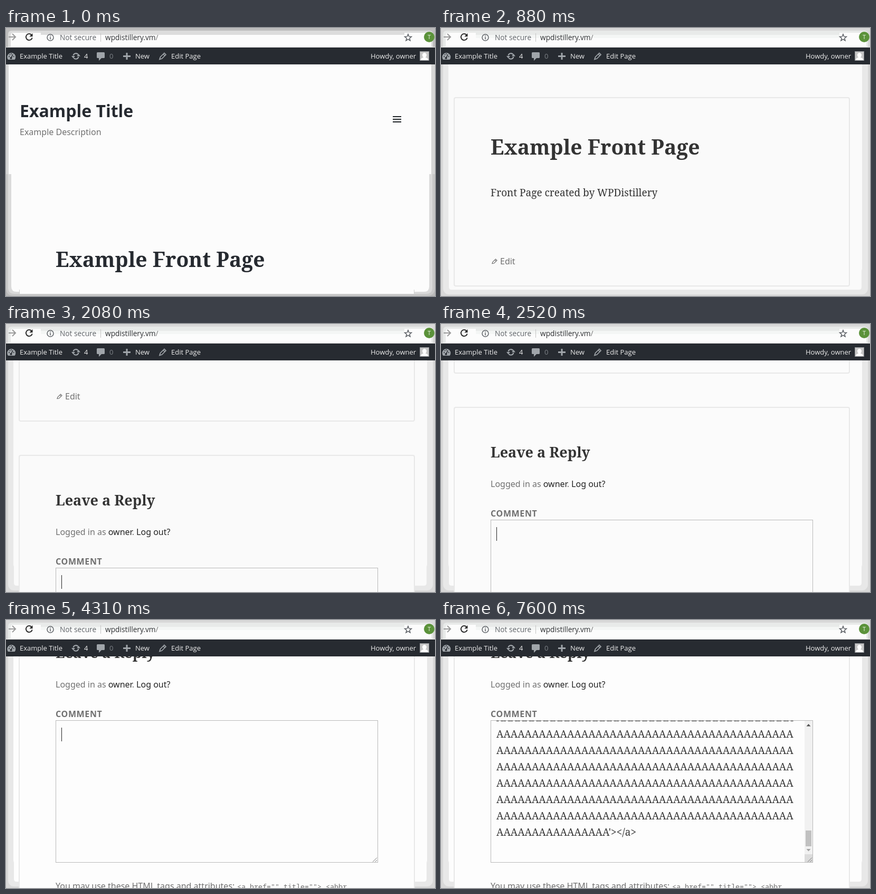
Write an HTML page that moves like this. It is 813 px wide and 508 px high and loops after 8 s.

```html
<!DOCTYPE html>
<html lang="en">
<head>
<meta charset="utf-8">
<title>Comment form</title>
<style>
  html, body { margin: 0; width: 100%; height: 100%; overflow: hidden; background: #d8d8d8; }
  svg { display: block; }
  text { white-space: pre; }
  .ui { font-family: "Open Sans", sans-serif; }
  .sans { font-family: "Noto Sans", sans-serif; font-size: 16px; fill: #707070; }
  .serif { font-family: "Noto Serif", serif; font-size: 19px; fill: #333; }
  .bold { font-weight: 700; }
  .mono { font-family: "Noto Sans Mono", monospace; font-size: 13.33px; }
  .bar { font-size: 13px; fill: #eee; }
  .menu { font-size: 14.7px; fill: #969696; }
  .menu .on { fill: #222; }
</style>
</head>
<body>
<svg width="813" height="508" viewBox="0 0 813 508" xmlns="http://www.w3.org/2000/svg">
  <defs>
    <clipPath id="view"><rect y="69" width="813" height="439"/></clipPath>
    <clipPath id="field"><rect x="95" y="981" width="594" height="268"/></clipPath>
  </defs>

  <g id="edgeA">
    <rect width="813" height="508" fill="#b9b9b9"/>
    <path d="M0 69H813V277H0Z" fill="#d6d6d6"/>
    <path d="M5 69H806V277H5Z" fill="#fcfcfc"/>
    <path d="M0 277H813V492Q813 508 797 508H16Q0 508 0 492Z" fill="#c8c8c8"/>
    <path d="M4 277H808V492Q808 504 796 504H16Q4 504 4 492Z" fill="#dadada"/>
    <path d="M10 277H802V490Q802 500 792 500H774V504H26V500H20Q10 500 10 490Z" fill="#fcfcfc"/>
    <path d="M25.5 496V505M773.5 496V505" stroke="#d0d0d0"/>
  </g>
  <g id="edgeB">
    <rect width="813" height="508" fill="#d8d8d8"/>
    <rect x="4" y="0" width="805" height="505" rx="11" fill="#e8e8e8"/>
    <path id="paper" d="M14 69H798V456L797 460V491Q797 496 792 496H20Q15 496 15 491V460L14 456Z"/>
    <rect id="tail" x="25" y="480" width="749" height="28"/>
  </g>

  <g clip-path="url(#view)">
    <g id="page">
      <g id="cards" fill="none" stroke="#e8e8e8" stroke-width="2">
        <rect x="25" y="345" width="749" height="357" rx="3"/>
        <rect x="25" y="767" width="749" height="700" rx="3"/>
      </g>
      <text class="sans bold" x="26" y="169" style="font-size:32px;fill:#262a30">Example Title</text>
      <text class="sans" x="26" y="203">Example Description</text>
      <path d="M733 168H749M733 173H749M733 178H749" stroke="#22262a" stroke-width="2"/>

      <text id="heading" class="serif bold" x="94" y="453" style="font-size:39px">Example Front Page</text>
      <text class="serif" x="94" y="532">Front Page created by WPDistillery</text>
      <path d="M97 659.500L98 656.500L103.500 651L106 653.500L100.500 659ZM102 652.500L104.500 655" fill="none" stroke="#707070" stroke-width="1.200"/>
      <text class="sans" x="112" y="661">Edit</text>

      <text class="serif bold" x="94" y="862" style="font-size:27px">Leave a Reply</text>
      <text class="sans" x="94" y="918">Logged in as <tspan fill="#222">owner</tspan>. <tspan fill="#222">Log out?</tspan></text>
      <text class="sans bold" x="94" y="974" letter-spacing=".64">COMMENT</text>
      <rect id="box" x="94.500" y="980.500" width="610" height="269" stroke="#b9b9b9"/>
      <g id="pasted">
        <g id="lines" class="serif" clip-path="url(#field)"></g>
        <rect x="689" y="981" width="15" height="253" fill="#f1f1f1"/>
        <rect x="691" y="1189" width="11" height="30" fill="#c1c1c1"/>
        <path d="M692.500 991.500L696.500 987L700.500 991.500Z" fill="#505050"/>
        <path d="M692.500 1224L696.500 1228.500L700.500 1224Z" fill="#a3a3a3"/>
        <rect x="689" y="1234" width="15" height="15" fill="#dcdcdc"/>
      </g>
      <path d="M695 1248.500L703 1240.500M699.500 1248.500L703 1245" stroke="#777"/>
      <rect id="caret" x="105" width="1" height="26" fill="#222"/>
      <text class="sans" x="94" y="1300">You may use these HTML tags and attributes:</text>
      <text class="sans mono" style="font-family:'Noto Sans Mono',monospace;font-size:13.33px" x="438" y="1300">&lt;a href="" title=""&gt; &lt;abbr</text>
    </g>
  </g>

  <g id="menu" class="ui menu">
    <rect x="397.500" y="292" width="281" height="230" rx="10" fill="#e8e8e8"/>
    <rect x="402.500" y="295.500" width="271" height="230" fill="#fdfdfd" stroke="#bdbdbd"/>
    <rect id="hover" x="403" y="410" width="270" height="25" fill="#dfdfdf"/>
    <g id="items"></g>
    <path d="M661 504L666 508.500L661 513Z" fill="#555"/>
  </g>

  <g id="toolbar">
    <rect id="top0" width="813" height="37"/>
    <path id="top1" d="M4 37V12Q4 5 11 5H802Q809 5 809 12V37Z"/>
    <path d="M9 37V14Q9 9 14 9H66V13H755V9H799Q806 9 806 15V37Z" fill="#fcfcfc"/>
    <rect id="sheen" x="66" y="13" width="689" height="6" fill="#f4f6f5"/>
    <path d="M0 36.500H813" stroke="#e2e2e2"/>
    <path d="M5 17H18M12 11L18 17L12 23" fill="none" stroke="#9a9a9a" stroke-width="2"/>
    <path d="M48.300 13A6 6 0 1 0 49.700 18.500" fill="none" stroke="#2b2b2b" stroke-width="2"/>
    <path d="M50.500 10V16.200H44.300Z" fill="#2b2b2b"/>
    <circle cx="84" cy="18" r="6" fill="none" stroke="#5f6368" stroke-width="1.500"/>
    <path d="M84 17V21.500M84 14.300V15.800" stroke="#5f6368" stroke-width="1.600"/>
    <g class="ui" font-size="13.700">
      <text x="102" y="23" fill="#5f6368">Not secure</text>
      <text x="188" y="23" fill="#2b2d30">wpdistillery.vm<tspan fill="#777">/</tspan></text>
    </g>
    <path d="M179.500 10V26" stroke="#c4c4c4"/>
    <path id="star" fill="none" stroke="#50545a" stroke-width="1.400"/>
    <circle cx="802" cy="17" r="10" fill="#5b923a"/>
    <text class="ui" x="802" y="21" font-size="11" fill="#eef5ea" text-anchor="middle">T</text>

    <rect y="37" width="813" height="32" fill="#272b31"/>
    <g fill="#a0a5aa">
      <path d="M4 60A8 8 0 1 1 16.500 60Z"/>
      <path d="M172 47.500Q172 46 173.500 46H185.500Q187 46 187 47.500V55.500Q187 57 185.500 57H181L176 62V57H173.500Q172 57 172 55.500Z"/>
      <path d="M227.500 47H230.500V52H236V55H230.500V60H227.500V55H222V52H227.500Z"/>
      <path d="M124 53H131L127.500 57.500ZM141 53.500H134L137.500 49Z"/>
    </g>
    <path d="M5 54H7M6.500 50L8 51M10 48V50M13.500 54H15.500M9.500 57L13 50" stroke="#272b31" stroke-width="1.500"/>
    <circle cx="9.500" cy="57" r="2" fill="#272b31"/>
    <path d="M127.500 52A5.200 5.200 0 0 1 136.500 50M137.500 54.500A5.200 5.200 0 0 1 128.500 57" fill="none" stroke="#a0a5aa" stroke-width="2"/>
    <path d="M291 59.500L292.500 55L300 47.500L303 50.500L295.500 58ZM298 49.500L301 52.500" fill="none" stroke="#a0a5aa" stroke-width="1.700"/>
    <g class="ui bar">
      <text x="26" y="58">Example Title</text>
      <text x="148" y="58">4</text>
      <text x="196" y="58" fill="#7d8287" style="fill:#7d8287">0</text>
      <text x="245" y="58">New</text>
      <text x="313" y="58">Edit Page</text>
      <text x="691" y="58">Howdy, owner</text>
    </g>
    <rect x="784.500" y="44.500" width="17" height="17" fill="#c6c6c6" stroke="#8d9094"/>
    <path d="M786 61Q786 56.500 791 56Q788.500 53.500 789 50.500Q790 47 793 47Q796 47 797 50.500Q797.500 53.500 795 56Q800 56.500 800 61Z" fill="#fff"/>
  </g>
</svg>
<script>
  const LOOP = 8000, FIRST = 140, STEP = 1040 / 7, STEPS = 22;
  const $ = id => document.getElementById(id);
  const show = (id, on) => $(id).setAttribute('visibility', on ? 'visible' : 'hidden');
  const fill = (id, color) => $(id).setAttribute('fill', color);

  // [step, scroll offset]
  const stops = [[0, 0], [6, 213], [10, 396], [17, 609], [22, 790]];

  function scrollAt(step) {
    const i = Math.max(1, stops.findIndex(p => p[0] >= step));
    const [a, from] = stops[i - 1], [b, to] = stops[i];
    return Math.round(from + (to - from) * (step - a) / (b - a));
  }

  function label(parent, x, y, str, attrs = {}) {
    const el = document.createElementNS('http://www.w3.org/2000/svg', 'text');
    Object.entries({ x, y, ...attrs }).forEach(([k, v]) => el.setAttribute(k, v));
    el.textContent = str;
    $(parent).append(el);
    return el;
  }

  for (let i = 0; i < 7; i++) label('lines', 105, 982 + 31 * i, 'A'.repeat(42));
  label('lines', 105, 1199, 'A'.repeat(16) + "'></a>");

  const entries = [
    ['Undo', 'Ctrl+Z', 317], ['Redo', 'Ctrl+Shift+Z', 342],
    ['Cut', 'Ctrl+X', 378], ['Copy', 'Ctrl+C', 403],
    ['Paste', 'Ctrl+V', 428], ['Paste as plain text', 'Ctrl+Shift+V', 453],
    ['Select all', 'Ctrl+A', 478], ['Spellcheck', '', 514]
  ];
  let pasteKey;
  for (const [name, key, y] of entries) {
    label('items', 435, y, name, { class: /^(Paste|Spell)/.test(name) ? 'on' : '' });
    const el = label('items', 650, y, key, { 'text-anchor': 'end' });
    if (name === 'Paste') pasteKey = el;
  }

  const points = Array.from({ length: 10 }, (_, i) => {
    const a = i * Math.PI / 5, r = i % 2 ? 2.9 : 6.8;
    return (762 + r * Math.sin(a)).toFixed(2) + ' ' + (18.5 - r * Math.cos(a)).toFixed(2);
  });
  $('star').setAttribute('d', 'M' + points.join('L') + 'Z');

  const within = (t, a, b) => t >= a && t < b;

  function draw(t) {
    const step = Math.min(STEPS, Math.max(0, Math.floor((t - FIRST + 6) / STEP) + 1));
    const moved = step > 0, pasted = t >= 7150;
    const paper = t < 2380 ? '#fafafa' : t < 3260 ? '#fbfbfb' : '#fdfdfd';

    $('page').setAttribute('transform', `translate(0 ${-scrollAt(step)})`);
    show('edgeA', !moved);
    show('edgeB', moved);
    show('tail', step > 6);
    show('cards', moved);
    show('sheen', moved);
    ['paper', 'tail', 'box'].forEach(id => fill(id, paper));
    fill('top0', moved ? '#d8d8d8' : '#bdbdbd');
    fill('top1', moved ? '#e8eae9' : '#dcdcdc');
    $('heading').style.fill = moved ? '#333' : '#262a30';

    show('pasted', pasted);
    $('caret').setAttribute('y', pasted ? 1210 : 994);
    show('caret', !within(t, 2665, 3105) && !within(t, 3710, 4310) && t < 7600);

    const hover = within(t, 5810, 6400);
    show('menu', within(t, 4910, 6400));
    show('hover', hover);
    pasteKey.setAttribute('class', hover ? 'on' : '');
  }

  function tick() {
    draw(performance.now() % LOOP);
    requestAnimationFrame(tick);
  }
  tick();
</script>
</body>
</html>
```
